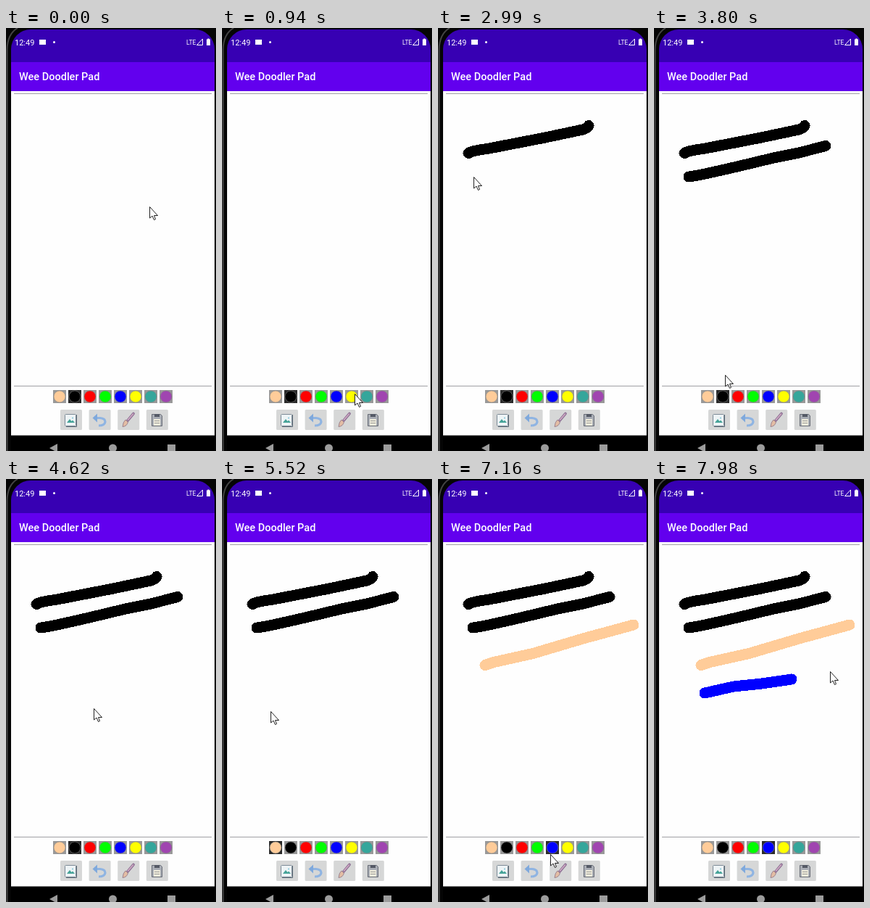
These frames come from a looping animation (290x583 px, 8000 ms). An HTML page:

```html
<!DOCTYPE html>
<html>
<head>
<meta charset="utf-8">
<style>
html, body { margin: 0; width: 100%; height: 100%; overflow: hidden; background: #000; }
svg { display: block; width: 290px; height: 583px; }
text { font-family: Roboto, sans-serif; fill: #fff; }
</style>
</head>
<body>
<svg viewBox="0 0 290 583">
  <defs>
    <clipPath id="screen"><path d="M7 583V29A27 27 0 0 1 34 2H261A27 27 0 0 1 288 29V583Z"/></clipPath>
  </defs>
  <rect width="290" height="583" fill="#050505"/>
  <path d="M1.500 583V30Q2 8 16 0" fill="none" stroke="#444" stroke-width="2"/>
  <g clip-path="url(#screen)">
    <rect x="7" width="281" height="47" fill="#3700b3"/>
    <rect x="7" y="47" width="281" height="40" fill="#6200ee"/>
    <rect x="7" y="87" width="281" height="475" fill="#fefefe"/>
    <rect x="7" y="561.500" width="281" height="22"/>
  </g>

  <text x="12" y="24" font-size="11">12:49</text>
  <rect x="46" y="16" width="9" height="7" fill="#fff"/>
  <circle cx="66.500" cy="19.500" r="1.500" fill="#fff"/>
  <text x="249" y="23" font-size="8.500">LTE</text>
  <path d="M263.500 23.500H271.500V15Z" fill="none" stroke="#fff"/>
  <path d="M277 15.500H278.500V14.500H280.500V15.500H282V24H277Z" fill="#fff"/>
  <text x="18" y="72" font-size="14.500" font-weight="500">Wee Doodler Pad</text>

  <path d="M11 90.500H284M11 493.500H284" stroke="#a0a0a4"/>
  <g id="strokes" fill="none" stroke-width="15" stroke-linecap="round" stroke-linejoin="round" shape-rendering="crispEdges"></g>
  <g id="swatches"></g>
  <g id="buttons" fill="#d6d7d7"></g>

  <!-- picture -->
  <rect x="81.500" y="532.500" width="15" height="16" rx="1" fill="#eef4f6" stroke="#7d8a96"/>
  <path d="M97.500 533V549.500H83" fill="none" stroke="#5c6a76"/>
  <path d="M84 544L88 539L90.500 542L92 540.500L95 544Z" fill="#45a398"/>
  <circle cx="92" cy="537.500" r="1" fill="#7cc4d8"/>
  <!-- undo -->
  <path d="M124 537.500H130Q137 538 137 543Q136 548 128 548" fill="none" stroke="#8fb4e2" stroke-width="3.200"/>
  <path d="M119.500 537.500L126 531.500V543.500Z" fill="#7fa9dc"/>
  <!-- brush -->
  <path d="M176 531.500L168 541" stroke="#8a6d92" stroke-width="3.600" stroke-linecap="round"/>
  <path d="M175.500 532L168.500 540" stroke="#cfa9c2" stroke-width="1.800" stroke-linecap="round"/>
  <path d="M165 540L168.500 543Q167 549 161 549.500Q161.500 543 165 540Z" fill="#e3bda4" stroke="#8d7284" stroke-width=".8"/>
  <!-- disk -->
  <path d="M201.500 532.500H213.500L215.500 534.500V548.500H201.500Z" fill="#a9adb5" stroke="#666b75"/>
  <path d="M205 532H212V536H205Z" fill="#555a66"/>
  <rect x="204" y="539" width="9" height="9" fill="#f0eddc"/>
  <path d="M205 541.500H212M205 544.500H212" stroke="#999"/>

  <g fill="#9c9c9c">
    <path d="M60 579L71 573V585Z"/>
    <circle cx="147.500" cy="579" r="5.500"/>
    <rect x="223" y="574" width="11" height="10"/>
  </g>
  <path id="cursor" d="M.5 .5V16L4 13L6.500 18.500L8.500 17.500L6.500 12.500H11.500Z" fill="#fff" stroke="#222"/>
</svg>
<script>
const LOOP = 8000, REFRESH = 130;
const $ = id => document.getElementById(id);

function add(parent, tag, attrs) {
  const el = document.createElementNS("http://www.w3.org/2000/svg", tag);
  for (const k in attrs) el.setAttribute(k, attrs[k]);
  return parent.appendChild(el);
}

for (let i = 0; i < 4; i++)
  add($("buttons"), "rect", { x: 75 + 39.6 * i, y: 526, width: 30, height: 28, rx: 1.5 });

const colors = ["#ffcc99", "#000", "#f00", "#0f0", "#00f", "#ff0", "#35a69b", "#a045b0"];
const swatches = colors.map((fill, i) => {
  const x = 65 + 21 * i;
  const box = add($("swatches"), "rect", { x, y: 499, width: 18, height: 18 });
  add($("swatches"), "circle", { cx: x + 9, cy: 508, r: 8, fill, stroke: "#888", "stroke-opacity": .6 });
  return box;
});

// Where the pointer is at each time; it may draw on its way there or pick a colour on arrival.
const stops = [
  { at: 0, x: 198, y: 246, pick: 1 },
  { at: 170, x: 198, y: 246 },
  { at: 560, x: 205, y: 564 },
  { at: 810, x: 61, y: 510 },
  { at: 940, x: 183, y: 504 },
  { at: 1110, x: 183, y: 504 },
  { at: 1860, x: 47, y: 200 },
  { at: 2010, x: 42, y: 172 },
  { at: 2400, x: 208, y: 134, draw: "M42 172.500Q47 169 68 166.500L148 151L200 140Q206 138 208 134.500" },
  { at: 2990, x: 49, y: 205 },
  { at: 3265, x: 237, y: 162, draw: "M48 205Q62 204 165 179L200 172L237 162.500" },
  { at: 3410, x: 140, y: 277 },
  { at: 3800, x: 98, y: 478 },
  { at: 3920, x: 93, y: 508 },
  { at: 4620, x: 121, y: 316 },
  { at: 5130, x: 72, y: 510, pick: 0 },
  { at: 5640, x: 65, y: 257 },
  { at: 6180, x: 270, y: 201, draw: "M65 256.500L77 252.500L131 240.500L202 219.500L270 201" },
  { at: 6540, x: 157, y: 514, pick: 4 },
  { at: 7160, x: 155, y: 517 },
  { at: 7324, x: 70, y: 295 },
  { at: 7652, x: 190, y: 276, draw: "M70 295L110 286L149 282L190 276" },
  { at: 7980, x: 243, y: 265 }
];

let color = 0;
for (const s of stops) {
  if (s.draw) s.line = add($("strokes"), "path", { d: s.draw, stroke: colors[color], pathLength: 1 });
  color = s.pick ?? color;
}

// Share of the way from one stop to the next, advancing once per refresh.
function progress(from, to, t) {
  const span = to.at - from.at, steps = Math.max(1, Math.round(span / REFRESH));
  const k = Math.floor((t - from.at) / span * steps) / steps;
  return Math.min(1, Math.max(0, k));
}

function draw(now) {
  const t = now % LOOP;
  let picked, x, y, hidden;

  stops.forEach((from, i) => {
    const to = stops[i + 1];
    if (t >= from.at) picked = from.pick ?? picked;
    if (!to) return;
    const k = progress(from, to, t);
    if (to.line) {
      to.line.setAttribute("stroke-dasharray", k + " 2");
      to.line.setAttribute("visibility", k > 0 ? "visible" : "hidden");
    }
    if (t >= from.at) {
      x = from.x + (to.x - from.x) * k;
      y = from.y + (to.y - from.y) * k;
      // No pointer while the finger is down, until it moves away again.
      hidden = k > 0 ? to.line : from.line;
    }
  });

  swatches.forEach((el, i) => el.setAttribute("fill", i === picked ? "#2b2b2b" : "#999"));
  $("cursor").setAttribute("visibility", hidden ? "hidden" : "visible");
  $("cursor").setAttribute("transform", `translate(${Math.round(x)} ${Math.round(y)})`);
  requestAnimationFrame(draw);
}
requestAnimationFrame(draw);
</script>
</body>
</html>
```
